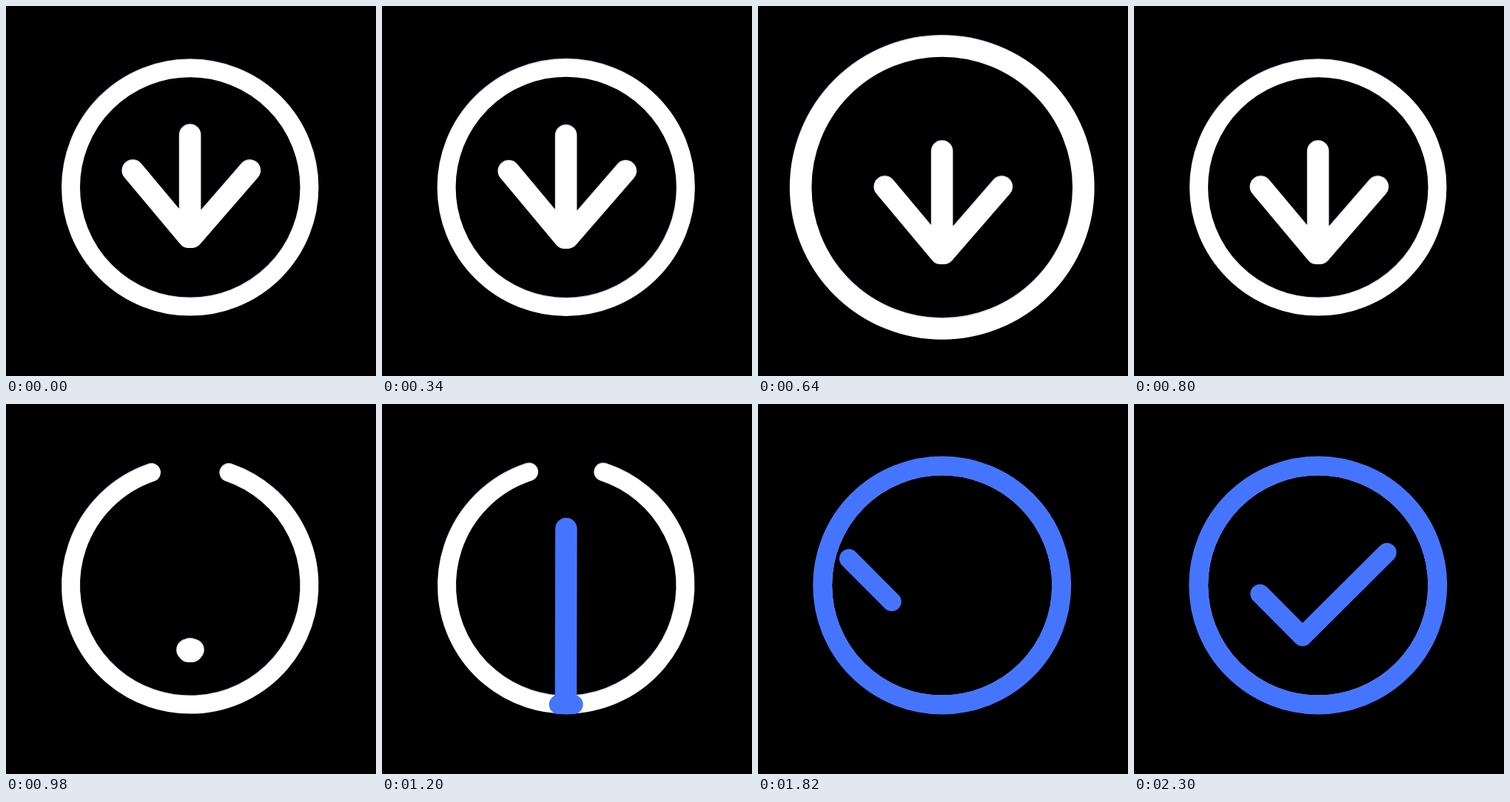
Animation, 500 px wide and 500 px high, one loop 2.4 s. Source, as an HTML page with a canvas:

```html
<!DOCTYPE html>
<html lang="en">
<head>
<meta charset="utf-8">
<title>Download to done</title>
<style>
  html, body { margin: 0; width: 100%; height: 100%; overflow: hidden; background: #000; }
  canvas { display: block; width: 100vw; height: 100vh; object-fit: contain; }
</style>
</head>
<body>
<canvas id="stage" width="500" height="500"></canvas>
<script>
const ctx = document.getElementById('stage').getContext('2d');
const LOOP = 2400, CX = 248.7, CY = 244.9, BLUE = '#4575ff';
const RAD = Math.PI / 180;

const lerp = (a, b, p) => a + (b - a) * p;
const span = (t, from, to) => Math.min(1, Math.max(0, (t - from) / (to - from)));
const smooth = p => (1 - Math.cos(Math.PI * p)) / 2;
const easeOut = p => 1 - (1 - p) ** 2;

ctx.lineCap = ctx.lineJoin = 'round';

function stroke(path, color, width) {
  ctx.strokeStyle = color;
  ctx.lineWidth = width;
  ctx.stroke(path);
}

// White with a soft lavender inner shadow along the upper left edges.
function strokeWhite(path, width) {
  stroke(path, '#c4ccff', width);
  ctx.save();
  ctx.globalCompositeOperation = 'source-atop';
  ctx.shadowColor = '#fff';
  ctx.shadowBlur = 3;
  ctx.translate(0.6, 1.4);
  stroke(path, '#fff', width);
  ctx.restore();
}

function polyline(points, path = new Path2D()) {
  points.forEach(([x, y], i) => i ? path.lineTo(x, y) : path.moveTo(x, y));
  return path;
}

// Arc centred on a direction, reaching `half` degrees to both sides of it.
function arc(radius, direction, half) {
  const path = new Path2D();
  path.arc(CX, CY, radius, (direction - half) * RAD, (direction + half) * RAD);
  return path;
}

function whiteRing(t) {
  const scale = 1 + 0.205 * smooth(span(t, 320, 600)) * (1 - smooth(span(t, 600, 800)));
  const gap = 23.8 * smooth(span(t, 840, 1040)) * (1 - span(t, 1040, 1710));
  strokeWhite(arc(161.2, 90, 180 - gap), 25 * scale, scale);
}

function arrow(t) {
  const fold = smooth(span(t, 800, 1000));
  if (fold === 1) return;
  const dy = 22 * smooth(span(t, 320, 480));
  const path = new Path2D();
  const limb = (x, y, tipX) => polyline([
    [lerp(x, tipX, fold), lerp(y, 312.3, fold) + dy], [tipX, 312.3 + dy]
  ], path);
  limb(171.2, 222, 246.8);
  limb(329.3, 222, 251);
  limb(248.6, 174, 248.6);
  strokeWhite(path, 29.6);
}

function drop(t) {
  if (t < 1000 || t > 1650) return;
  const tail = lerp(86, 404, span(t, 1044, 1645));
  const head = lerp(86, 404, span(t, 1000, 1190));
  stroke(polyline([[248.9, tail], [248.4, Math.max(head, tail)]]), BLUE, 29.5);
}

function blueRing(t) {
  const half = 180 * span(t, 1192, 1600);
  if (half > 0) stroke(arc(161.5, 90, half), BLUE, 26);
}

function check(t) {
  const p = easeOut(span(t, 1710, 2300));
  if (p === 0) return;
  const start = [98.7, 184.8], corner = [227.7, 314.2], end = [341.7, 200.7];
  const first = Math.hypot(corner[0] - start[0], corner[1] - start[1]);
  const second = Math.hypot(end[0] - corner[0], end[1] - corner[1]);
  const at = d => {
    const [a, b, q] = d < first ? [start, corner, d / first] : [corner, end, (d - first) / second];
    return [lerp(a[0], b[0], q), lerp(a[1], b[1], q)];
  };
  const head = p * (first + second);
  const points = [at(p * 101.3)];
  if (head > first) points.push(corner);
  points.push(at(head));
  stroke(polyline(points), BLUE, 26);
}

function draw(t) {
  ctx.clearRect(0, 0, 500, 500);
  [whiteRing, arrow, drop, blueRing, check].forEach(part => part(t));
}

// The ring grows about its own centre.
function scaledArc(radius, scale, half) {
  return arc(radius * scale, 90, half);
}

whiteRing = t => {
  const scale = 1 + 0.205 * smooth(span(t, 320, 600)) * (1 - smooth(span(t, 600, 800)));
  const gap = 23.8 * smooth(span(t, 840, 1040)) * (1 - span(t, 1040, 1710));
  strokeWhite(scaledArc(161.2, scale, 180 - gap), 25 * scale);
};

const begin = performance.now();
function tick() {
  const t = (performance.now() - begin) % LOOP;
  draw(Math.floor(t / 20) * 20);
  requestAnimationFrame(tick);
}
tick();
</script>
</body>
</html>
```
